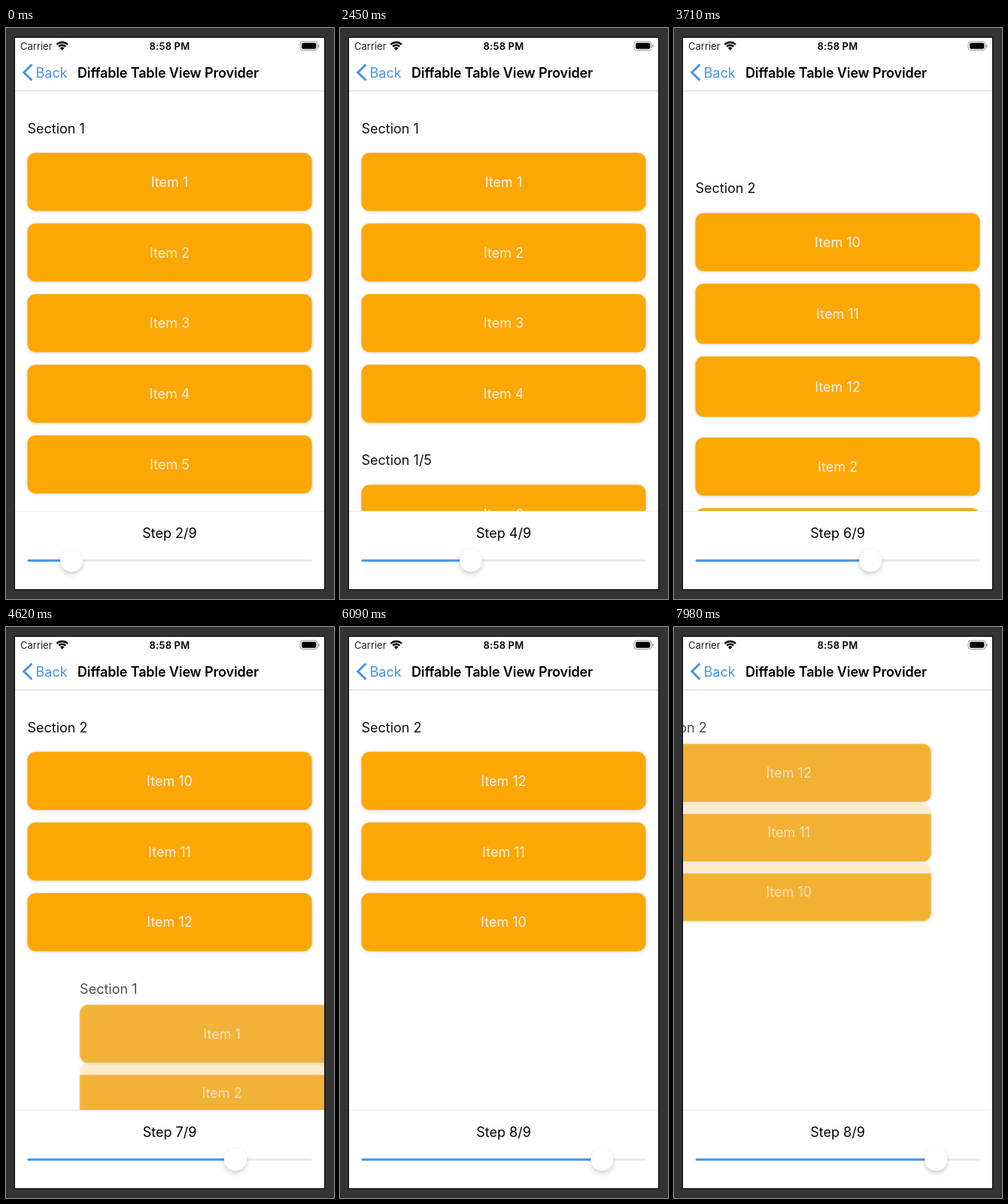
Recreate the animation shown at these times as an HTML page with a canvas. Size 436 by 758 pixels, loop 8 s.

```html
<!DOCTYPE html>
<html lang="en">
<head>
<meta charset="utf-8">
<title>Diffable Table View Provider</title>
<style>
  html, body { margin: 0; width: 100%; height: 100%; overflow: hidden; background: #333; }
  canvas { display: block; }
</style>
</head>
<body>
<canvas id="stage" width="436" height="758"></canvas>
<script>
const ctx = document.getElementById('stage').getContext('2d');
const LOOP = 8000, DURATION = 300;
const LEFT = 12, WIDTH = 411, TABLE_TOP = 84, TABLE_BOTTOM = 641;
const CARD = 77, PITCH = 93.75, HEADER = 66.3, SECTION_GAP = 65.8;
const BLUE = '#4295e6', ORANGE = '#fca702';

const second = ['Section 1/5', [6, 7, 8, 9]];
const four = ['Section 1', [1, 2, 3, 4]];
const last = ['Section 2', [10, 11, 12]];
const states = {
  2: [['Section 1', [1, 2, 3, 4, 5]], second],
  3: [['Section 1', [1, 2]], second],
  4: [four, second],
  5: [four, last],
  6: [last, four],
  7: [last],
  8: [['Section 2', [12, 11, 10]]],
  9: []
};
// step, start of the slider drag, start of the table update
const timeline = [
  [2, -1000, -900], [3, 560, 880], [4, 1680, 1860], [5, 2460, 2840], [6, 3430, 3495],
  [7, 4480, 4540], [8, 4970, 5192], [9, 6790, 6918], [8, 7759, 7759]
];

const clamp = v => Math.max(0, Math.min(1, v));
const ease = v => (1 - Math.cos(Math.PI * clamp(v))) / 2;
const mix = (a, b, p) => a + (b - a) * p;

function layout(step) {
  const cells = new Map();
  let top = 99.5;
  for (const [title, items] of states[step]) {
    cells.set(title, { y: top, top, title });
    items.forEach((n, i) => cells.set(n, { y: top + HEADER + PITCH * i, top, title }));
    top += SECTION_GAP + PITCH * items.length;
  }
  return cells;
}

function text(str, x, y, { size = 18, weight = 400, color = '#000', align = 'left', spacing = 0 } = {}) {
  ctx.font = `${weight} ${size}px Inter, sans-serif`;
  ctx.letterSpacing = spacing + 'px';
  ctx.textAlign = align;
  ctx.textBaseline = 'alphabetic';
  ctx.fillStyle = color;
  ctx.fillText(str, x, y + size * 0.364);
}

function box(x, y, w, h, r, color) {
  ctx.fillStyle = color;
  ctx.beginPath();
  ctx.roundRect(x, y, w, h, r);
  ctx.fill();
}

function shadow(color, blur, dy) {
  ctx.shadowColor = color;
  ctx.shadowBlur = blur;
  ctx.shadowOffsetY = dy;
}

function drawCell(id, { x, y, alpha, h }) {
  ctx.save();
  ctx.globalAlpha = clamp(alpha);
  ctx.translate(x, y);
  if (typeof id === 'string') {
    text(id, 28.5, 33.5, { color: '#111' });
  } else {
    box(LEFT, 0, WIDTH, h + 16, 0, '#fff');
    ctx.save();
    shadow('rgba(0,0,0,.22)', 4, 0.5);
    box(28.5, 0, 378, h, 11, ORANGE);
    ctx.restore();
    text('Item ' + id, 217.5, h / 2, { color: '#f4f2ee', align: 'center' });
  }
  ctx.restore();
}

function drawTable(fromStep, toStep, p) {
  const from = layout(fromStep), to = layout(toStep);
  // the middle row starts two slots lower while the order is reversed
  if (fromStep === 7 && p < 1) from.get(11).y += 2 * PITCH;

  const ids = [...new Set([...from.keys(), ...to.keys()])];
  const cells = ids.map(id => {
    const a = from.get(id), b = to.get(id), cell = a || b;
    const pose = { x: 0, y: cell.y, alpha: 1, h: CARD };
    const gone = a ? p : 1 - p;
    if (a && b) {
      pose.y = mix(a.y, b.y, p);
    } else if ((a && !to.has(a.title)) || !from.size) {
      pose.x = WIDTH * gone * (a ? 1 : -1);
      pose.y = mix(cell.y, cell.top, gone);
      pose.alpha = 1 - 1.5 * gone;
    } else {
      pose.alpha = 1 - gone;
    }
    // rows coming from below the fold still shrink from their estimated height
    if (toStep === 6 && (id === 11 || id === 12)) {
      pose.h += 16 * (1 - p);
      if (id === 12) pose.y += 16 * (1 - p);
    }
    const depth = (b ? 0 : 1e7) + (b || a).top * 1000 + (a || b).y;
    return { id, pose, depth };
  });

  ctx.save();
  ctx.beginPath();
  ctx.rect(LEFT, TABLE_TOP, WIDTH, TABLE_BOTTOM - TABLE_TOP);
  ctx.clip();
  cells.sort((m, n) => n.depth - m.depth).forEach(c => drawCell(c.id, c.pose));
  ctx.restore();
}

function drawWifi(x, y) {
  const start = -Math.PI * 0.75, end = -Math.PI * 0.25;
  ctx.strokeStyle = ctx.fillStyle = '#000';
  ctx.lineWidth = 2.4;
  for (const r of [10.3, 6.5]) {
    ctx.beginPath();
    ctx.arc(x, y, r, start, end);
    ctx.stroke();
  }
  ctx.beginPath();
  ctx.moveTo(x, y + 0.5);
  ctx.arc(x, y, 3.9, start, end);
  ctx.fill();
}

function drawBars() {
  text('Carrier', 19, 24, { size: 13, color: '#222' });
  drawWifi(74.7, 29.3);
  text('8:58 PM', 217.5, 24, { size: 13, weight: 600, align: 'center', spacing: 0.2 });

  ctx.strokeStyle = '#999';
  ctx.lineWidth = 1;
  ctx.beginPath();
  ctx.roundRect(391, 18, 23, 11.5, 3.5);
  ctx.stroke();
  box(393, 19.8, 19.3, 8, 2, '#000');
  box(415, 22, 1.5, 4, 1, '#999');

  ctx.strokeStyle = BLUE;
  ctx.lineWidth = 3;
  ctx.beginPath();
  ctx.moveTo(34.5, 48.5);
  ctx.lineTo(23.8, 59);
  ctx.lineTo(34.5, 69.5);
  ctx.stroke();
  text('Back', 39.5, 59.5, { color: BLUE });
  text('Diffable Table View Provider', 95, 59.5, { weight: 600, spacing: -0.15 });
  box(LEFT, 83, WIDTH, 1, 0, '#d8d8d8');
}

function drawSlider(step, value) {
  const x = 43.55 * value;
  box(LEFT, TABLE_BOTTOM, WIDTH, 1, 0, '#ececec');
  text(`Step ${step}/9`, 217.5, 670.5, { align: 'center' });
  box(28.5, 705.5, 378, 3, 1.5, '#e9e9ea');
  box(28.5, 705.5, x - 28.5, 3, 1.5, BLUE);
  ctx.save();
  shadow('rgba(0,0,0,.2)', 6, 3);
  box(x - 15, 692, 30, 30, 15, '#fff');
  ctx.restore();
}

function draw(t) {
  const dragIndex = timeline.findLastIndex(e => t >= e[1]);
  const index = timeline.findLastIndex(e => t >= e[2]);
  const previous = i => timeline[Math.max(0, i - 1)][0];
  const [target, dragStart, dragEnd] = timeline[dragIndex];
  const [step, , start] = timeline[index];

  box(0, 0, 436, 758, 0, '#333');
  box(11, 12, 413, 734, 0, '#000');
  box(LEFT, 13, WIDTH, 732, 0, '#fff');
  drawTable(previous(index), step, ease((t - start) / DURATION));
  drawBars();
  const drag = ease((t - dragStart) / Math.max(1, dragEnd - dragStart));
  drawSlider(step, mix(previous(dragIndex), target, drag));
}

const origin = performance.now();
function tick() {
  draw((performance.now() - origin) % LOOP);
  requestAnimationFrame(tick);
}
tick();
</script>
</body>
</html>
```
